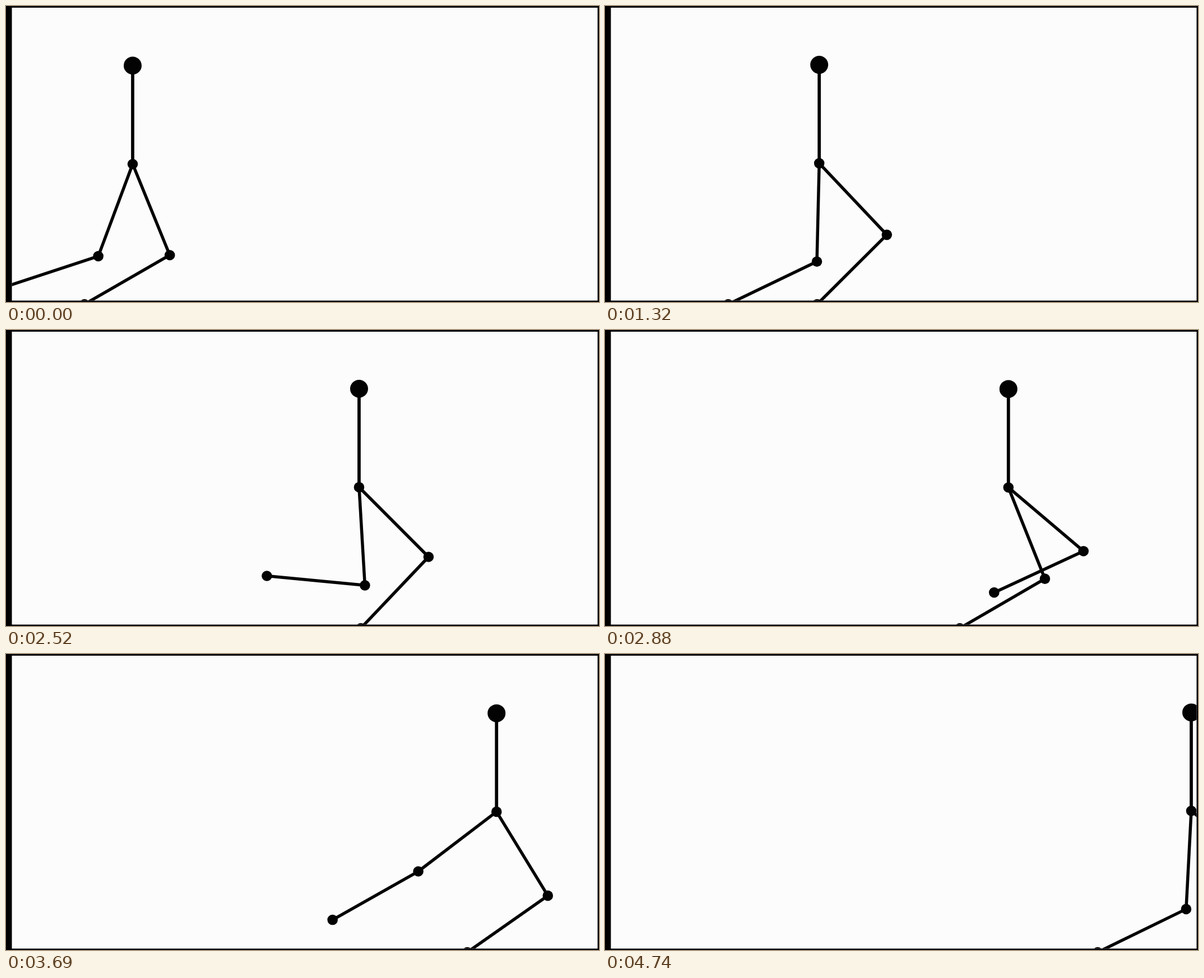
Animation, 1058 px wide and 529 px high, one loop 4770 ms. Source, as an HTML page with a canvas:

```html
<!DOCTYPE html>
<html lang="en">
<head>
<meta charset="utf-8">
<title>Walking stick figure</title>
<style>
  html, body { margin: 0; width: 100%; height: 100%; overflow: hidden; background: #000; }
  canvas { display: block; width: 1058px; height: 529px; }
</style>
</head>
<body>
<canvas id="stage" width="1058" height="529"></canvas>
<script>
const LOOP = 4770, STEP = 30, PAUSE = 300;
const GROUND = 533, SPINE = 176, LIMB = 175.7;
const INK = '#030303';
const ctx = document.getElementById('stage').getContext('2d');

// The hip moves at an even pace between these moments.
const hipKeys = [
  [300, 226], [840, 320], [1380, 390], [2010, 546.5], [2400, 600],
  [3390, 847], [4140, 917.5], [4260, 929], [4740, 1046]
];

// A foot drags along the ground, is airborne from `up` to `down` (shares of
// the stride), then slides to rest. `back` kicks it backwards at the start.
const strides = [
  [
    { start: 135, span: 725, from: -60, to: 378.5, lift: 78, up: 0.12, down: 0.95 },
    { start: 2237, span: 998, from: 378.5, to: 823, lift: 122, up: 0.1, down: 0.76 },
    { start: 4600, span: 617, from: 823, to: 1250, lift: 110, up: 0.27, down: 0.8 }
  ],
  [
    { start: 1022, span: 1169, from: 140, to: 633, lift: 110, up: 0.27, down: 0.8 },
    { start: 3540, span: 1190, from: 633, to: 1080, lift: 136, up: 0, down: 0.9, back: 950 }
  ]
];

const clamp = v => Math.min(1, Math.max(0, v));
const mix = (a, b, u) => a + (b - a) * u;
const smooth = u => u * u * (3 - 2 * u);

function hipX(time) {
  const next = Math.max(1, hipKeys.findIndex(key => key[0] >= time));
  const [t0, x0] = hipKeys[next - 1], [t1, x1] = hipKeys[next];
  return mix(x0, x1, clamp((time - t0) / (t1 - t0)));
}

function footAt(list, time) {
  const s = list.findLast(stride => stride.start <= time) ?? list[0];
  const u = clamp((time - s.start) / s.span);
  const air = clamp((u - s.up) / (s.down - s.up));
  const kick = (s.back ?? 0) * u * (1 - u) ** 4;
  return [mix(s.from, s.to, smooth(u)) - kick, GROUND - s.lift * Math.sin(Math.PI * air)];
}

function line(from, to, width = 5.5) {
  ctx.lineWidth = width;
  ctx.beginPath();
  ctx.moveTo(...from);
  ctx.lineTo(...to);
  ctx.stroke();
}

function dot([x, y], radius = 9.3) {
  ctx.beginPath();
  ctx.arc(x, y, radius, 0, 2 * Math.PI);
  ctx.fill();
}

// Two equal limbs, with the knee always bending forward.
function leg(hip, foot) {
  const dx = foot[0] - hip[0], dy = foot[1] - hip[1];
  const reach = Math.hypot(dx, dy);
  const bend = Math.sqrt(Math.max(0, LIMB * LIMB - reach * reach / 4)) / reach;
  const knee = [hip[0] + dx / 2 + dy * bend, hip[1] + dy / 2 - dx * bend];
  line(hip, knee);
  line(knee, foot);
  dot(knee);
  dot(foot);
}

function drawWalker(time) {
  const feet = strides.map(list => footAt(list, time));
  const x = hipX(time);
  // The body sinks slightly as it passes the leading foot.
  const y = 281 + 0.017 * (x - Math.max(...feet.map(foot => foot[0])));
  const hip = [x, y], head = [x, y - SPINE];
  ctx.fillStyle = ctx.strokeStyle = INK;
  line(hip, head, 5.8);
  dot(head, 16);
  feet.forEach(foot => leg(hip, foot));
  dot(hip);
}

function draw(time) {
  ctx.fillStyle = '#000';
  ctx.fillRect(0, 0, 1058, 529);
  ctx.save();
  ctx.beginPath();
  ctx.rect(10.5, 3, 1045, 523.5);
  ctx.fillStyle = '#fcfcfc';
  ctx.fill();
  ctx.clip();
  drawWalker(Math.max(PAUSE, time));
  ctx.restore();
}

const start = performance.now();
function tick() {
  const time = (performance.now() - start) % LOOP;
  draw(Math.floor(time / STEP) * STEP);
  requestAnimationFrame(tick);
}
tick();
</script>
</body>
</html>
```
